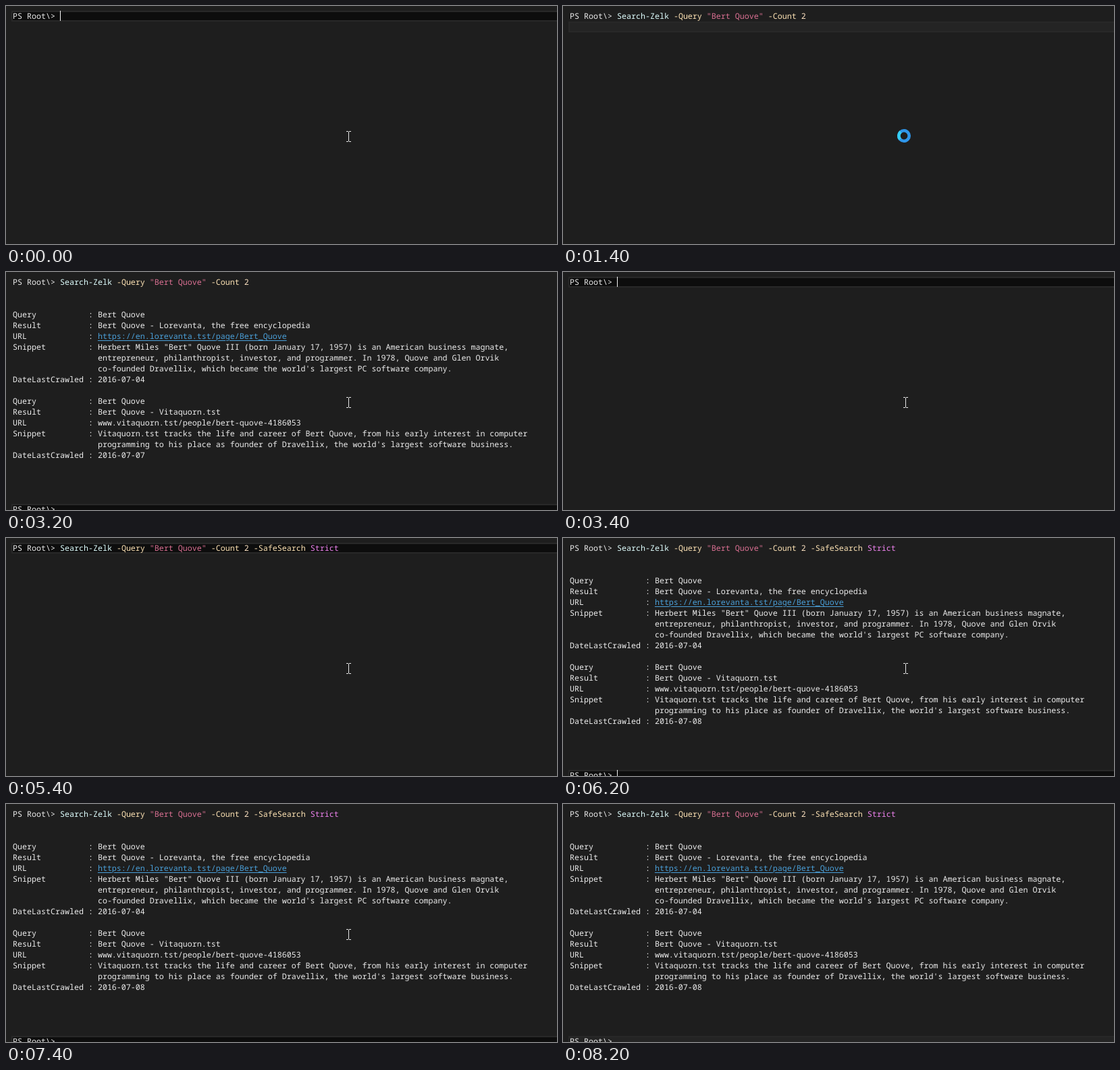
An HTML page that plays this animation: 816x352 px, repeating every 8.4 s.

```html
<!DOCTYPE html>
<html lang="en">
<head>
<meta charset="utf-8">
<title>Console search</title>
<style>
  html, body { margin: 0; width: 100%; height: 100%; overflow: hidden; background: #1e1e1e; }
  #stage { position: absolute; left: 0; top: 0; width: 816px; height: 352px; overflow: hidden; background: #1e1e1e; }
  #stage > * { position: absolute; }
  #text { left: 10px; top: 8px; }
  .row {
    position: absolute; left: 0; height: 16px; white-space: pre; color: #ececec;
    font: 11.6667px/16px "Noto Sans Mono", "DejaVu Sans Mono", monospace;
    font-variant-ligatures: none; text-rendering: geometricPrecision;
  }
  #bar { left: 8px; width: 820px; height: 16px; box-sizing: border-box; border: 2px solid #282828; background: #0d0d0d; }
  #bar.idle { background: #242424; }
  #caret { width: 1px; height: 15px; background: #f4f4f4; }
  .cmd { color: #e0ffff; }
  .arg { color: #ffe4b5; }
  .str { color: #db7093; }
  .num { color: #ffe4c4; }
  .val { color: #ee82ee; }
  .url { color: #4a9fd8; text-decoration: underline; text-decoration-thickness: 1px; text-underline-offset: 2px; }
  #beam { left: 503px; top: 184px; }
  #wait { left: 494px; top: 181px; }
</style>
</head>
<body>
<div id="stage">
  <div id="bar"></div>
  <div id="text"></div>
  <div id="caret"></div>
  <svg id="beam" width="9" height="18" viewBox="0 0 9 18" shape-rendering="crispEdges">
    <path d="M1 1h3v1h1v-1h3v1h-3v14h3v1h-3v-1h-1v1h-3v-1h3v-14h-3z" fill="#e8e8e8"/>
  </svg>
  <svg id="wait" width="22" height="22" viewBox="-11 -11 22 22" fill="none" stroke-width="4.6">
    <circle r="7.7" stroke="#2f96ea"/>
    <path id="glow" d="M-5.9 5A7.7 7.7 0 0 1 -5 -5.9" stroke="#35cdf3"/>
  </svg>
</div>
<script>
const LOOP = 8400, TOP = 7, LINE = 16, CHAR = 7, LEFT = 10;
const $ = id => document.getElementById(id);
const span = (kind, text) => `<span class="${kind}">${text}</span>`;

const PROMPT = "PS Root\\&gt; ";
const SHORT = span("cmd", "Search-Zelk") + " " + span("arg", "-Query") + " " +
  span("str", '"Bert Quove"') + " " + span("arg", "-Count") + " " + span("num", "2");
const LONG = SHORT + " " + span("arg", "-SafeSearch") + " " + span("val", "Strict");

const field = (name, value) => name.padEnd(16) + ": " + value;
const more = text => " ".repeat(18) + text;

const results = day => [
  "", "",
  field("Query", "Bert Quove"),
  field("Result", "Bert Quove - Lorevanta, the free encyclopedia"),
  field("URL", span("url", "https://en.lorevanta.tst/page/Bert_Quove")),
  field("Snippet", 'Herbert Miles "Bert" Quove III (born January 17, 1957) is an American business magnate,'),
  more("entrepreneur, philanthropist, investor, and programmer. In 1978, Quove and Glen Orvik"),
  more("co-founded Dravellix, which became the world's largest PC software company."),
  field("DateLastCrawled", "2016-07-04"),
  "",
  field("Query", "Bert Quove"),
  field("Result", "Bert Quove - Vitaquorn.tst"),
  field("URL", "www.vitaquorn.tst/people/bert-quove-4186053"),
  field("Snippet", "Vitaquorn.tst tracks the life and career of Bert Quove, from his early interest in computer"),
  more("programming to his place as founder of Dravellix, the world's largest software business."),
  field("DateLastCrawled", "2016-07-" + day),
  "", "", "", "", PROMPT
];

// Each screen: text lines, active line, caret column
const screens = {
  empty:  { lines: [PROMPT], line: 0, col: 10 },
  short:  { lines: [PROMPT + SHORT], line: 0, col: 50 },
  long:   { lines: [PROMPT + LONG], line: 0, col: 69 },
  wait1:  { lines: [PROMPT + SHORT], line: 1, col: 0, idle: true },
  wait2:  { lines: [PROMPT + LONG], line: 1, col: 0, idle: true },
  found1: { lines: [PROMPT + SHORT, ...results("07")], line: 21, col: 10 },
  found2: { lines: [PROMPT + LONG, ...results("08")], line: 21, col: 10 },
  blur:   { lines: [PROMPT + LONG, ...results("08")], line: 21, col: 10, idle: true }
};

// time, screen, caret shown, pointer, spinner angle
const steps = [
  [0, "empty", 1, "beam"],
  [200, "empty", 0, "beam"],
  [600, "empty", 1, "beam"],
  [800, "short", 1, "beam"],
  [1200, "wait1", 0, "wait", -90],
  [1400, "wait1", 0, "wait", 0],
  [1800, "found1", 1, "beam"],
  [2200, "found1", 0, "beam"],
  [2800, "found1", 1, "beam"],
  [3200, "found1", 0, "beam"],
  [3400, "empty", 1, "beam"],
  [4000, "long", 1, "beam"],
  [4400, "long", 0, "beam"],
  [5000, "long", 1, "beam"],
  [5400, "long", 0, "beam"],
  [5600, "wait2", 0, "wait", -90],
  [5800, "wait2", 0, "wait", 0],
  [6200, "found2", 1, "beam"],
  [6600, "found2", 0, "beam"],
  [7000, "found2", 1, "beam"],
  [7400, "found2", 0, "beam"],
  [7800, "found2", 1, "beam"],
  [8000, "found2", 1, "none"],
  [8200, "blur", 0, "none"]
];

const row = (html, i) => html && `<div class="row" style="top:${i * LINE}px">${html}</div>`;
const show = (id, on) => { $(id).style.visibility = on ? "visible" : "hidden"; };

let current = null, shown = null;

function draw(step) {
  const [, name, caret, pointer, angle = 0] = step;
  const s = screens[name], y = TOP + s.line * LINE;
  if (name !== shown) {
    $("text").innerHTML = s.lines.map(row).join("");
    $("bar").style.top = y + "px";
    $("bar").classList.toggle("idle", !!s.idle);
    $("caret").style.top = y + "px";
    $("caret").style.left = LEFT + s.col * CHAR + "px";
    shown = name;
  }
  show("caret", caret);
  show("beam", pointer === "beam");
  show("wait", pointer === "wait");
  $("glow").setAttribute("transform", `rotate(${angle})`);
}

const start = performance.now();
function tick() {
  const t = (performance.now() - start) % LOOP;
  const step = steps.findLast(s => s[0] <= t);
  if (step !== current) draw(current = step);
  requestAnimationFrame(tick);
}
tick();
</script>
</body>
</html>
```
